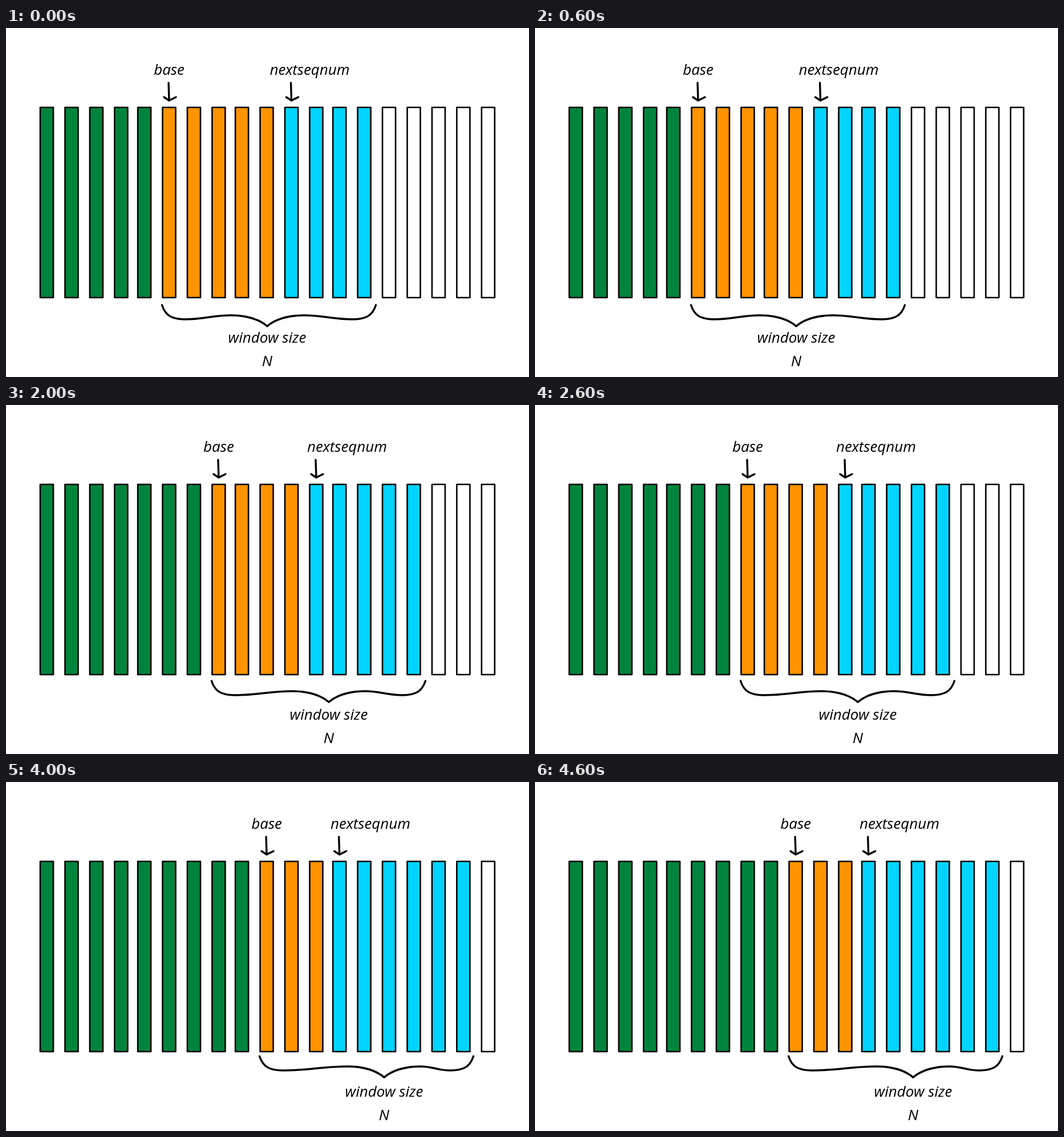
Animation, 917 px wide and 611 px high, one loop 5000 ms. Source, as an HTML page:

```html
<!DOCTYPE html>
<html lang="en">
<head>
<meta charset="utf-8">
<title>Sliding window</title>
<style>
  html, body { margin: 0; width: 100%; height: 100%; overflow: hidden; background: #fff; }
  svg { display: block; }
  path { fill: none; stroke: #000; stroke-width: 3.4; stroke-linecap: round; stroke-linejoin: round; }
  rect { stroke: #000; stroke-width: 2.6; stroke-linejoin: round; }
  text { font: italic 26px "Open Sans", "Noto Sans", sans-serif; text-anchor: middle; }
</style>
</head>
<body>
<svg id="stage" width="917" height="611" viewBox="0 0 917 611"></svg>
<script>
const STEP_MS = 1000, BARS = 19, WINDOW = 9, FIRST_BASE = 5;
const BAR_WIDTH = 23, BRACE_WIDTH = 375;
const GREEN = '#00843d', ORANGE = '#ff9300', BLUE = '#00d4ff';

// next: index of the next bar to send; mid, top: brace tip x and end y.
const steps = [
  { next: 10, nextLabel: 532.5, mid: 458, top: 485 },
  { next: 10, nextLabel: 532.5, mid: 521, top: 483 },
  { next: 11, nextLabel: 598, mid: 566, top: 483 },
  { next: 12, nextLabel: 639, mid: 603, top: 488 },
  { next: 12, nextLabel: 639, mid: 663, top: 480 },
];

const text = (s, x, y) => `<text x="${x}" y="${y}">${s}</text>`;
const path = d => `<path d="${d}"/>`;

// Every fourth gap is slightly narrower, except the last.
const barX = i => 60 + 43.45 * i - 2.75 * Math.min(3, Math.floor(i / 4));
const barMid = i => barX(i) + BAR_WIDTH / 2;

function bar(i, base, next) {
  const fill = i < base ? GREEN : i < next ? ORANGE : i < base + WINDOW ? BLUE : '#fff';
  return `<rect x="${barX(i)}" y="139" width="${BAR_WIDTH}" height="333" fill="${fill}"/>`;
}

const arrow = x => path(`M${x - 1} 96L${x} 127M${x - 9} 121L${x} 127L${x + 12} 121`);

// One side of the brace: from its end down to a trough, over a crest, to the tip.
function halfBrace(end, top, mid, dir) {
  const trough = end + 41 * dir, crest = mid - 64 * dir;
  const low = top + 25, high = top + 18, bend = (crest - trough) * .4;
  return path(`M${end} ${top}
    C${end + 6 * dir} ${top + 19} ${trough - 23 * dir} ${low} ${trough} ${low}
    C${trough + bend} ${low} ${crest - bend} ${high} ${crest} ${high}
    C${crest + 29 * dir} ${high} ${mid - 13 * dir} ${high + 8} ${mid} ${top + 37}`);
}

function draw(n) {
  const { next, nextLabel, mid, top } = steps[n];
  const base = FIRST_BASE + n, left = barX(base) - 1;
  const bars = Array.from({ length: BARS }, (_, i) => bar(i, base, next));
  stage.innerHTML = bars.join('') +
    text('base', barMid(base), 82) + arrow(barMid(base)) +
    text('nextseqnum', nextLabel, 82) + arrow(barMid(next)) +
    halfBrace(left, top, mid, 1) + halfBrace(left + BRACE_WIDTH, top, mid, -1) +
    text('window size', mid, 551) + text('N', mid, 592);
}

const stage = document.getElementById('stage');
const start = performance.now();
let shown = -1;

function tick() {
  const n = Math.floor((performance.now() - start) / STEP_MS) % steps.length;
  if (n !== shown) draw(shown = n);
  requestAnimationFrame(tick);
}
tick();
</script>
</body>
</html>
```
